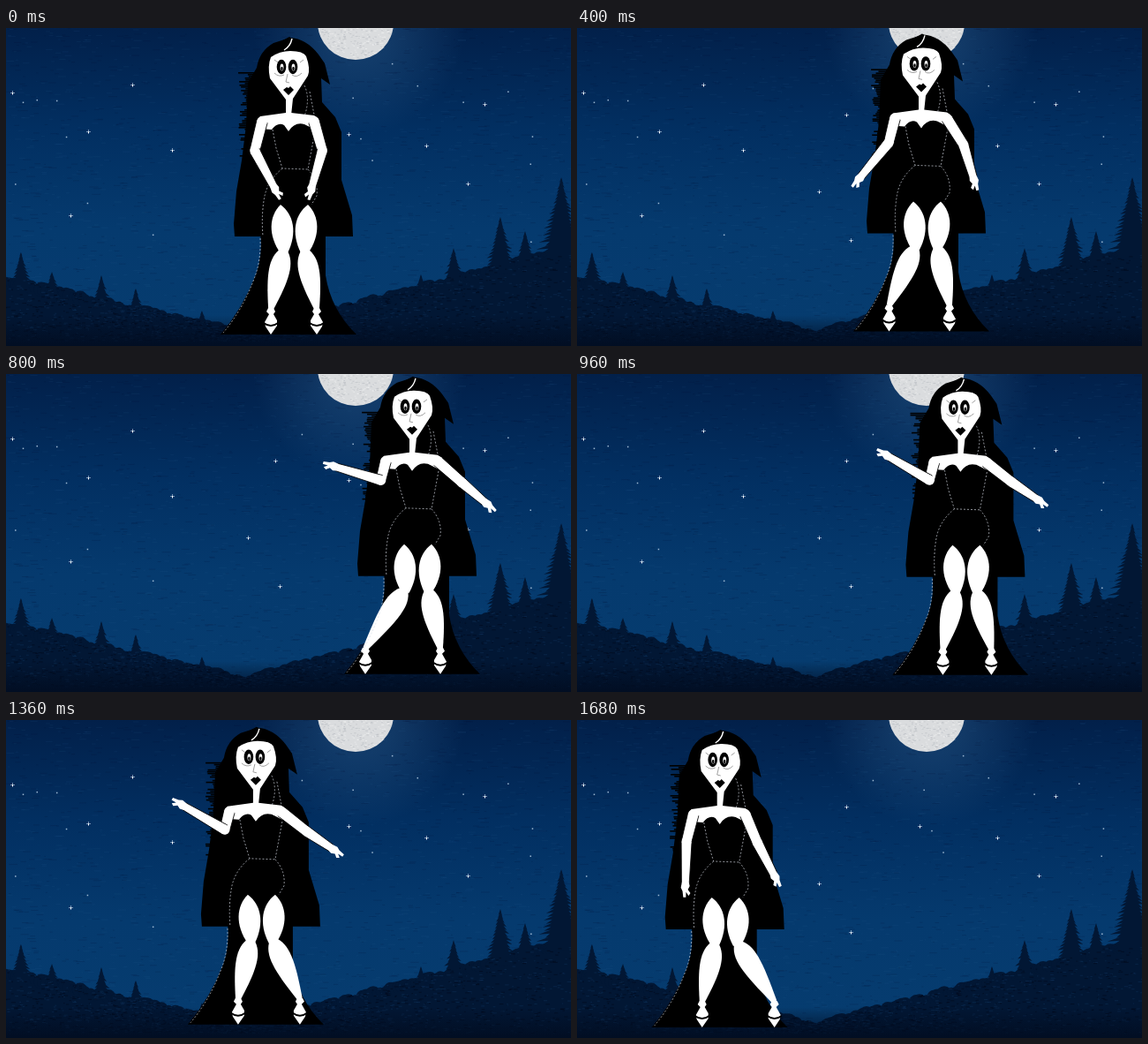
Write an HTML page with a canvas that moves like this. It is 640 px wide and 360 px high and loops after 1760 ms.

```html
<!DOCTYPE html>
<html>
<head>
<meta charset="utf-8">
<style>
html, body { margin: 0; width: 100%; height: 100%; overflow: hidden; background: #02204a; }
canvas { display: block; }
</style>
</head>
<body>
<canvas id="stage" width="640" height="360"></canvas>
<script>
const STEP = 80, COUNT = 22, TURN = 11;
const view = document.getElementById('stage').getContext('2d');
const backdrop = document.createElement('canvas');
backdrop.width = 640;
backdrop.height = 360;
let g = backdrop.getContext('2d');

function randomFrom(seed) {
  return () => (seed = (seed * 16807) % 2147483647) / 2147483647;
}

function shape(path, fill, stroke, width = 1) {
  const p = new Path2D(path);
  if (fill) { g.fillStyle = fill; g.fill(p); }
  if (stroke) { g.strokeStyle = stroke; g.lineWidth = width; g.stroke(p); }
}

function oval(x, y, rx, ry, fill) {
  g.fillStyle = fill;
  g.beginPath();
  g.ellipse(x, y, rx, ry, 0, 0, 7);
  g.fill();
}

function fade(gradient, ...colors) {
  colors.forEach((c, i) => gradient.addColorStop(i / (colors.length - 1), c));
  return gradient;
}

// ---- Night scene, painted once ----
const rnd = randomFrom(77);
const ridge = x => 346 - (x < 270 ? (270 - x) * .226 : (x - 270) * .26);

function speckle(count, place, light, dark, length) {
  for (let i = 0; i < count; i++) {
    g.fillStyle = rnd() < .5 ? light : dark;
    g.fillRect(...place(), 1 + rnd() * length, 1);
  }
}

function fir(x, top) {
  const height = ridge(x) + 10 - top, half = height * .26 + 3;
  g.beginPath();
  g.moveTo(x, top);
  for (let y = 4; y < height; y += 4) {
    const w = half * y / height;
    g.lineTo(x + w * (.8 + rnd() * .4), top + y);
    g.lineTo(x + w * .6, top + y - 1);
  }
  for (let y = height; y > 0; y -= 4) {
    const w = half * y / height;
    g.lineTo(x - w * .6, top + y - 1);
    g.lineTo(x - w * (.8 + rnd() * .4), top + y);
  }
  g.fill();
}

function paintBackdrop() {
  g.fillStyle = fade(g.createLinearGradient(0, 0, 0, 340), '#02204a', '#022f61', '#053a6e', '#063c6f');
  g.fillRect(0, 0, 640, 360);
  g.fillStyle = fade(g.createRadialGradient(400, 0, 40, 400, 0, 120), 'rgba(50,105,155,.32)', 'rgba(50,105,155,0)');
  g.fillRect(260, 0, 280, 130);
  speckle(2200, () => [rnd() * 640, rnd() * 340], 'rgba(50,105,160,.1)', 'rgba(0,16,48,.17)', 9);

  oval(396, -6, 43, 42, '#dadcde');
  speckle(260, () => {
    const a = rnd() * Math.PI, r = 41 * Math.sqrt(rnd());
    return [396 + r * Math.cos(a), -6 + r * Math.sin(a)];
  }, 'rgba(250,250,250,.4)', 'rgba(165,170,178,.4)', 2);

  for (const [x, y] of [[7, 73], [93, 117], [188, 138], [143, 64], [73, 212], [388, 120],
    [476, 133], [542, 86], [523, 176], [310, 240], [305, 98], [274, 185]]) {
    g.fillStyle = 'rgba(200,220,240,.6)';
    g.fillRect(x - 2, y, 5, 1);
    g.fillRect(x, y - 2, 1, 5);
    g.fillStyle = '#fff';
    g.fillRect(x, y, 1, 2);
  }
  g.fillStyle = '#9db8d2';
  for (let i = 0; i < 18; i++) g.fillRect(rnd() * 640, 35 + rnd() * 235, 1.5, 1.5);

  const dark = '#021734';
  for (let x = 0; x < 645; x += 4) {
    const r = 4 + rnd() * 5;
    oval(x, ridge(x) + 2, r, r, dark);
    g.fillRect(x - 3, ridge(x), 7, 360);
  }
  for (const [x, top] of [[17, 254], [52, 276], [108, 280], [147, 295], [222, 320],
    [470, 279], [507, 249], [560, 214], [588, 230], [629, 169]]) fir(x, top);
  speckle(1700, () => {
    const x = rnd() * 640, y = ridge(x) - 4;
    return [x, y + rnd() * (354 - y)];
  }, 'rgba(18,56,98,.4)', 'rgba(0,6,22,.5)', 4);
  g.fillStyle = fade(g.createLinearGradient(0, 325, 0, 360), 'rgba(1,12,32,0)', 'rgba(1,12,32,.85)');
  g.fillRect(0, 325, 640, 35);
}

// ---- Motion rules, f counts steps ----
const glideX = f => Math.min(14 * f, 478 - 30.3 * f);
const glideY = f => Math.max(-.72 * f, .8 * f - 15.8);
const lift = (f, drop) => Math.min(f / TURN, 1, 1 - (f - 17) * drop);
const mix = (a, b, k) => a + (b - a) * k;

// ---- Figure ----
// Runs draw(length) with the x axis laid from a to b
function along(ax, ay, bx, by, draw) {
  g.save();
  g.translate(ax, ay);
  g.rotate(Math.atan2(by - ay, bx - ax));
  draw(Math.hypot(bx - ax, by - ay));
  g.restore();
}

function limb(ax, ay, bx, by, w1, w2) {
  along(ax, ay, bx, by, n => {
    shape(`M0 ${-w1}L${n} ${-w2}L${n} ${w2}L0 ${w1}Z`, '#fff', '#000', .8);
    oval(0, 0, w1 - .4, w1 - .4, '#fff');
  });
}

// Angles in degrees from hanging straight down, outward positive
function arm(x, side, upper, upperAngle, fore, foreAngle) {
  const end = (px, py, length, angle) => {
    const a = angle * Math.PI / 180;
    return [px + side * length * Math.sin(a), py + length * Math.cos(a)];
  };
  const [ex, ey] = end(x, 106, upper, upperAngle);
  const [wx, wy] = end(ex, ey, fore, foreAngle);
  limb(x, 106, ex, ey, 6.3, 5.8);
  limb(ex, ey, wx, wy, 6, 4.4);
  along(wx, wy, 2 * wx - ex, 2 * wy - ey, () => {
    g.scale(1, side);
    shape('M-1 -4L5 -5L9 -3L16 -2L16 1L10 1L14 4L11 6L7 3L3 5L-1 4Z', '#fff');
  });
}

function leg(hipX, kneeX, ankleX, side) {
  along(hipX, 200, kneeX, 255, n =>
    shape(`M0 0C12 -14 ${n - 22} -17 ${n} -4L${n} 4C${n - 22} 17 12 14 0 0Z`, '#fff'));
  along(kneeX, 250, ankleX, 318, n =>
    shape(`M0 -3C13 -16 34 -13 ${n} -3L${n} 3C34 13 13 16 0 3Z`, '#fff'));
  g.save();
  g.translate(ankleX, 317);
  g.scale(side, 1);
  shape('M-3 0L3 0L5 4L3 7L7 14L7 20L0 30L-6 21L-7 16L-2 7L-5 4Z', '#fff');
  shape('M-8 17Q0 23 8 17', null, '#000', 2);
  g.restore();
}

function head() {
  shape('M300 33Q310 26 322 26Q337 26 340 32Q345 46 342 54L325 80L323 99L317 99L317 81L299 57Q296 43 300 33Z', '#fff');
  shape('M297 32Q312 28 322 14Q327 26 343 31L342 22L321 10L302 20Z', '#000');
  shape('M324 12Q322 21 315 25', null, '#fff', 1.4);
  for (const x of [312, 325]) {
    oval(x, 44, 5.3, 8.2, '#000');
    oval(x + .5, 44.5, 1.9, 4, '#fff');
    oval(x + .5, 46, 1.2, 2.2, '#000');
  }
  shape('M304 36L308 39M333 39L337 36M304 51Q309 56 315 53M324 53Q329 57 335 51M319 52L317 61L321 62', null, '#888', .8);
  shape('M314 70L318 67L320 68L322 66L326 70L320 76Z', '#000');
}

function hair(f) {
  shape('M322 11L303 17Q287 26 284 45L274 62L272 110L267 150L261 185L258 222L259 236L393 236L392 212L380 172' +
    'L380 118L373 101L358 84L357 57L367 64L361 40L354 30Q340 12 322 11Z', '#000');
  const strand = randomFrom(311 + f * 97);
  for (let y = 50; y < 155; y += 2) g.fillRect(263 + strand() * 12, y, 34, 1.6);
}

function figure(f) {
  const quick = lift(f, .2), slow = lift(f, .1);
  const stepLeft = f < TURN ? -3.3 * f : 0;
  const stepRight = Math.max(0, f - TURN) * 3;
  g.save();
  g.translate(glideX(f), glideY(f));
  hair(f);

  // Gown
  shape('M288 230Q291 258 283 279Q268 318 243 347L397 347Q368 319 362 280L362 230Z', '#000');
  leg(311, 315 + stepLeft * .07, 300 + stepLeft, 1);
  leg(342, 338 + stepRight * .04, 352 + stepRight, -1);

  // Bust
  shape('M317 96L288 100Q283 105 287 114L301 115Q308 106 315 110L320 117Q327 106 338 109L350 115L354 108Q355 102 349 99L323 96Z', '#fff');
  g.setLineDash([2, 2]);
  shape('M302 115L306 136L313 159L342 160L350 117M313 159Q297 172 293 190Q289 210 291 236M342 160Q354 173 352 190L346 200' +
    'M288 238Q289 264 281 284Q268 319 246 345M338 65Q345 80 338 100M344 72L349 98', null, 'rgba(215,220,230,.75)', .9);
  g.setLineDash([]);

  arm(290, -1, mix(34, 21, quick), 14, mix(46, 53, quick), mix(-28, 120, quick));
  arm(349, 1, mix(34, 36, quick), mix(16, 52, quick), mix(42, 34, quick), mix(-16, 56, slow));
  head();
  g.restore();
}

paintBackdrop();
g = view;
const start = performance.now();
function tick() {
  g.drawImage(backdrop, 0, 0);
  figure(Math.floor((performance.now() - start) / STEP) % COUNT);
  requestAnimationFrame(tick);
}
tick();
</script>
</body>
</html>
```
